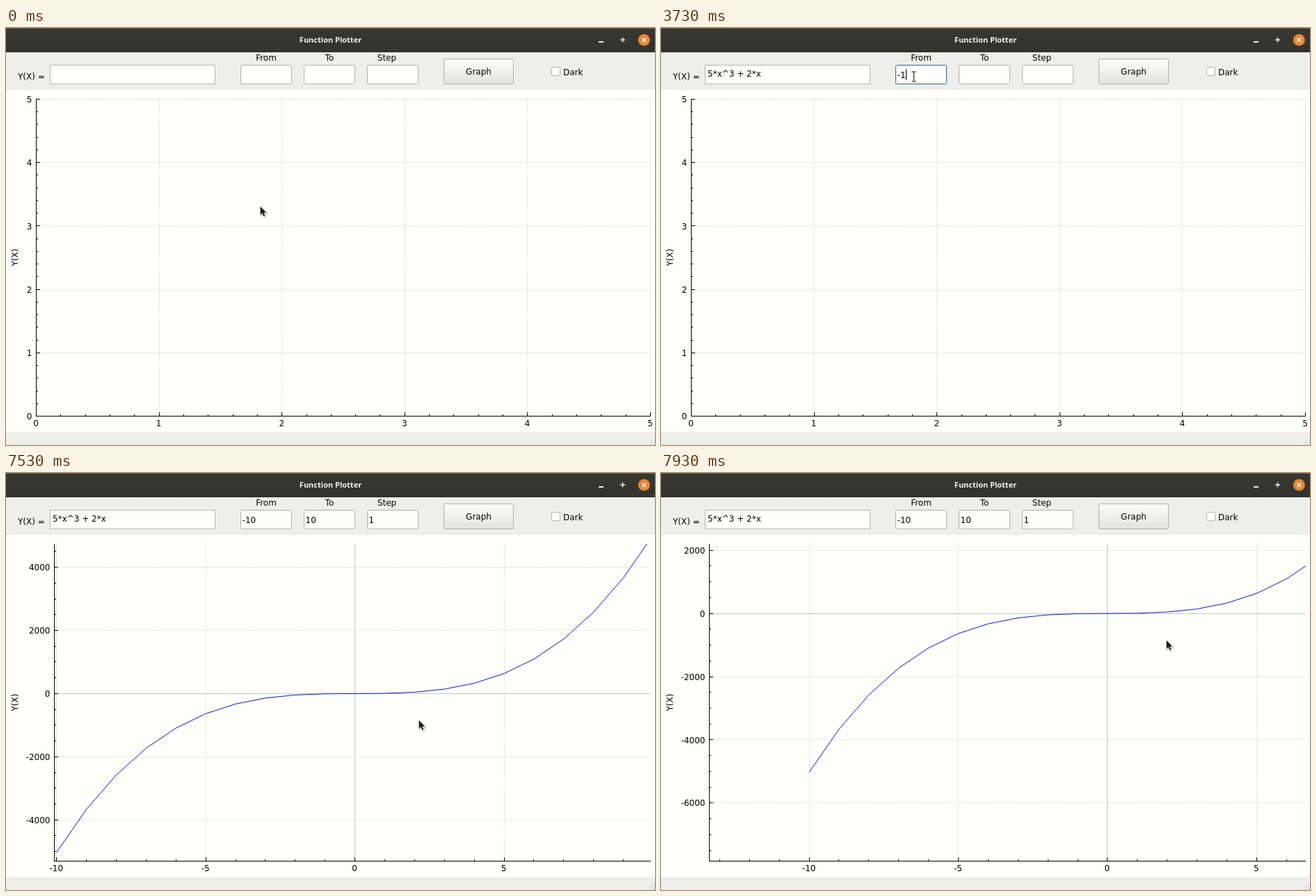
An HTML page with a canvas that plays this animation: 933x600 px, repeating every 8 s.

```html
<!DOCTYPE html>
<html lang="en">
<head>
<meta charset="utf-8">
<title>Function Plotter</title>
<style>
  html, body { margin: 0; width: 100%; height: 100%; overflow: hidden; background: #fffffc; }
  canvas { display: block; width: 933px; height: 600px; }
</style>
</head>
<body>
<canvas id="stage" width="933" height="600"></canvas>
<script>
const g = document.getElementById('stage').getContext('2d');
const LOOP = 8000;
const PAPER = '#fffffc', PANEL = '#eeeeeb', INK = '#000';
const UI = '12px "DejaVu Sans", sans-serif';

const formula = { x: 63, y: 53, w: 238, h: 28 };
const fields = [337, 428, 519].map(x => ({ x, y: 53, w: 74, h: 28 }));

// time, hot spot x, hot spot y
const pointer = [
  [0, 365, 256], [600, 320, 192], [730, 255, 100], [800, 217, 57],
  [1200, 222, 51], [1270, 220, 56], [1400, 218, 61],
  [2130, 238, 63], [2200, 264, 67], [2270, 295, 71], [2330, 324, 74],
  [2400, 364, 73], [2470, 400, 70], [2600, 363, 70],
  [5670, 379, 69], [5800, 445, 69], [5870, 528, 68], [5930, 565, 68],
  [6070, 601, 67], [6130, 627, 66], [6270, 648, 65], [6330, 667, 63],
  [7000, 660, 112], [7070, 641, 195], [7130, 616, 282], [7200, 596, 345], [7270, 589, 368],
  [7530, 593, 355], [7600, 611, 324], [7670, 635, 290],
  [7730, 660, 273], [7800, 685, 260], [7870, 708, 249], [7930, 726, 240]
];
// time, shift x, shift y of the dragged plot
const drag = [
  [0, 0, 0], [7530, 4, -13], [7600, 22, -46], [7670, 46.5, -79.3],
  [7730, 74, -97], [7800, 100, -110], [7870, 125, -121], [7930, 144.3, -128.3]
];
const typed = [
  [[0, ''], [3400, '-'], [3730, '-1'], [3930, '-10']],
  [[0, ''], [4470, '1'], [4670, '10']],
  [[0, ''], [5130, '1']]
];
const focus = [[0, -1], [2600, 0], [4130, 1], [4870, 2], [6470, 3], [7530, -1]];
const caretOn = [[0, 0], [1400, 1], [1800, 0], [1930, 1], [2330, 0], [2600, 1], [3200, 0], [3400, 1], [5800, 0]];

const at = (steps, t) => steps.findLast(s => s[0] <= t);

function rect(x, y, w, h, fill) {
  g.fillStyle = fill;
  g.fillRect(x, y, w, h);
}

function line(pts, color, width = 1) {
  g.beginPath();
  pts.forEach(([x, y]) => g.lineTo(x, y));
  g.strokeStyle = color;
  g.lineWidth = width;
  g.stroke();
}

function text(str, x, midY, align = 'left', font = UI, color = INK) {
  g.font = font;
  g.fillStyle = color;
  g.textAlign = align;
  g.fillText(str, x, midY + 4.4);
}

function box(b, fill, border, radius) {
  g.beginPath();
  g.roundRect(b.x + .5, b.y + .5, b.w - 1, b.h - 1, radius);
  g.fillStyle = fill;
  g.fill();
  g.strokeStyle = border;
  g.lineWidth = 1;
  g.stroke();
}

function shade(y0, y1, a, b) {
  const s = g.createLinearGradient(0, y0, 0, y1);
  s.addColorStop(0, a);
  s.addColorStop(1, b);
  return s;
}

function titleBar() {
  rect(0, 0, 933, 35, shade(0, 35, '#383731', '#33332e'));
  rect(0, 0, 933, 1, '#80603f');
  text('Function Plotter', 466.5, 17, 'center', 'bold 11px "Noto Sans", "Open Sans", sans-serif', '#f3f3f0');
  rect(852, 19, 7, 2, '#f3f3f0');
  rect(883, 16.3, 7, 1.5, '#f3f3f0');
  rect(885.8, 13.5, 1.5, 7, '#f3f3f0');
  g.beginPath();
  g.arc(917.3, 17.3, 8.5, 0, 7);
  g.fillStyle = '#e8862f';
  g.fill();
  line([[914.3, 14.3], [920.3, 20.3]], '#fff', 1.6);
  line([[920.3, 14.3], [914.3, 20.3]], '#fff', 1.6);
}

function caret(x, y) {
  rect(Math.round(x), y, 1, 16, INK);
}

function toolbar(t) {
  const active = at(focus, t)[1], blink = at(caretOn, t)[1];
  rect(0, 35, 933, 54, PANEL);
  text('Y(X) =', 17, 70);
  box(formula, PAPER, '#b6b6b2', 0);
  const expr = t < 1800 ? '' : '5*x^3 + 2*x';
  text(expr, 67, 65.5);
  if (blink && t < 2600) caret(67.5 + g.measureText(expr).width, 57);

  text('From', 374, 42.5, 'center');
  text('To', 465, 42.5, 'center');
  text('Step', 547.5, 42.5, 'center');
  fields.forEach((f, i) => {
    const on = i === active, str = at(typed[i], t)[1];
    box(f, PAPER, on ? '#2f628f' : '#b0b0ac', 2);
    text(str, f.x + 2.6, 67.3);
    if (on && blink) caret(f.x + 2.8 + g.measureText(str).width, 59);
  });

  box({ x: 629, y: 44, w: 101, h: 37 }, shade(44, 81, '#fdfdfb', '#e2e2df'),
    active === 3 ? '#3c668c' : '#acaca8', 2);
  text('Graph', 679.5, 62.5, 'center');
  box({ x: 784, y: 56, w: 13, h: 13 }, PAPER, '#b2b2ae', 1);
  text('Dark', 801, 63.2);
}

function ticks(lo, hi, step, draw) {
  for (let i = Math.ceil(lo / step - .001); i * step <= hi + step * .001; i++) draw(i);
}

// v: left edge, origin, pixels per unit, tick steps and subdivisions
function plot(v) {
  const top = 102, bottom = 558, right = 926.5;
  const px = x => v.ox + x * v.sx, py = y => v.oy - y * v.sy;
  const snap = n => Math.floor(n) + .5;
  const left = v.left + .5;
  const xr = [(left - v.ox) / v.sx, (right - v.ox) / v.sx];
  const yr = [(v.oy - 558.5) / v.sy, (v.oy - 102.3) / v.sy];

  const gridLine = (pts, solid) => {
    g.setLineDash(solid ? [] : [1, 2]);
    line(pts, solid ? '#c6c6c3' : '#bcbcb9');
    g.setLineDash([]);
  };
  ticks(...xr, v.dx, i => {
    const x = snap(px(i * v.dx));
    gridLine([[x, top], [x, bottom]], i === 0);
  });
  ticks(...yr, v.dy, i => {
    const y = snap(py(i * v.dy));
    gridLine([[left, y], [927, y]], i === 0);
  });

  if (v.curve) {
    g.save();
    g.beginPath();
    g.rect(left, top, 927 - left, bottom - top + 1);
    g.clip();
    const pts = Array.from({ length: 21 }, (_, i) => {
      const x = i - 10;
      return [px(x), py(5 * x ** 3 + 2 * x)];
    });
    line(pts, '#1010c4');
    g.restore();
  }

  rect(v.left, top, 1, bottom - top + 1, INK);
  rect(v.left, bottom, 927 - v.left, 1, INK);
  ticks(...xr, v.dx / v.nx, i => {
    const x = Math.floor(px(i * v.dx / v.nx)), major = i % v.nx === 0, len = major ? 5 : 2;
    rect(x, bottom - len, 1, len, INK);
    if (major) text(String(i / v.nx * v.dx), px(i / v.nx * v.dx) - .5, 568.8, 'center');
  });
  ticks(...yr, v.dy / v.ny, i => {
    const y = Math.floor(py(i * v.dy / v.ny)), major = i % v.ny === 0;
    rect(v.left + 1, y, major ? 5 : 2, 1, INK);
    if (major) text(String(i / v.ny * v.dy), v.left - 5.5, py(i / v.ny * v.dy) + .2, 'right');
  });

  g.save();
  g.translate(12.5, 330);
  g.rotate(-Math.PI / 2);
  text('Y(X)', 0, 0, 'center');
  g.restore();
}

const emptyView = { left: 43, ox: 43.5, oy: 558.5, sx: 176.6, sy: 91.2, dx: 1, dy: 1, nx: 5, ny: 5 };

function graphView(t) {
  const [, mx, my] = at(drag, t);
  return { left: 69, ox: 497.6 + mx, oy: 330.4 + my, sx: 42.88, sy: .04546,
    dx: 5, dy: 2000, nx: 5, ny: 4, curve: true };
}

function plotArea(t) {
  rect(0, 89, 933, 492, PAPER);
  plot(t < 6870 ? emptyView : graphView(t));
  // the repaint reaches only the top strip at first
  if (t >= 6470 && t < 6870) {
    g.save();
    g.beginPath();
    g.rect(0, 89, 933, 22);
    g.clip();
    rect(0, 89, 933, 22, PAPER);
    plot(graphView(t));
    g.restore();
  }
}

function statusBar() {
  rect(0, 581, 933, 19, PANEL);
  for (let r = 0; r < 4; r++)
    for (let c = 0; c <= r; c++) rect(931 - c * 3, 590 + r * 3, 1, 1, '#b4b4b0');
}

function beam(x, y) {
  const stem = (w, color) => {
    line([[x + .5, y - 6.5], [x + .5, y + 6.5]], color, w);
    for (const s of [-7, 7]) line([[x - 2.5, y + s], [x + 3.5, y + s]], color, w);
  };
  stem(2.6, 'rgba(255,255,255,.85)');
  stem(1.1, '#151515');
}

function arrow(x, y) {
  g.save();
  g.translate(x, y);
  g.beginPath();
  [[.6, .8], [.6, 13], [3.4, 10.5], [5.3, 15], [7.4, 14.1], [5.5, 9.8], [9.2, 9.6]]
    .forEach(p => g.lineTo(...p));
  g.closePath();
  g.shadowColor = 'rgba(0,0,0,.35)';
  g.shadowBlur = 2;
  g.shadowOffsetX = g.shadowOffsetY = 1;
  g.lineJoin = 'round';
  g.lineWidth = 1.6;
  g.strokeStyle = '#fff';
  g.stroke();
  g.shadowColor = 'transparent';
  g.fillStyle = '#1c1c1c';
  g.fill();
  g.restore();
}

function mouse(t) {
  const [, x, y] = at(pointer, t);
  const over = [formula, ...fields].some(f =>
    x >= f.x && x <= f.x + f.w && y >= f.y - 2 && y <= f.y + f.h);
  (over ? beam : arrow)(x, y);
}

function frame(now) {
  const t = now % LOOP;
  titleBar();
  toolbar(t);
  plotArea(t);
  statusBar();
  mouse(t);
}

const start = performance.now();
function tick() {
  frame(performance.now() - start);
  requestAnimationFrame(tick);
}
tick();
</script>
</body>
</html>
```
